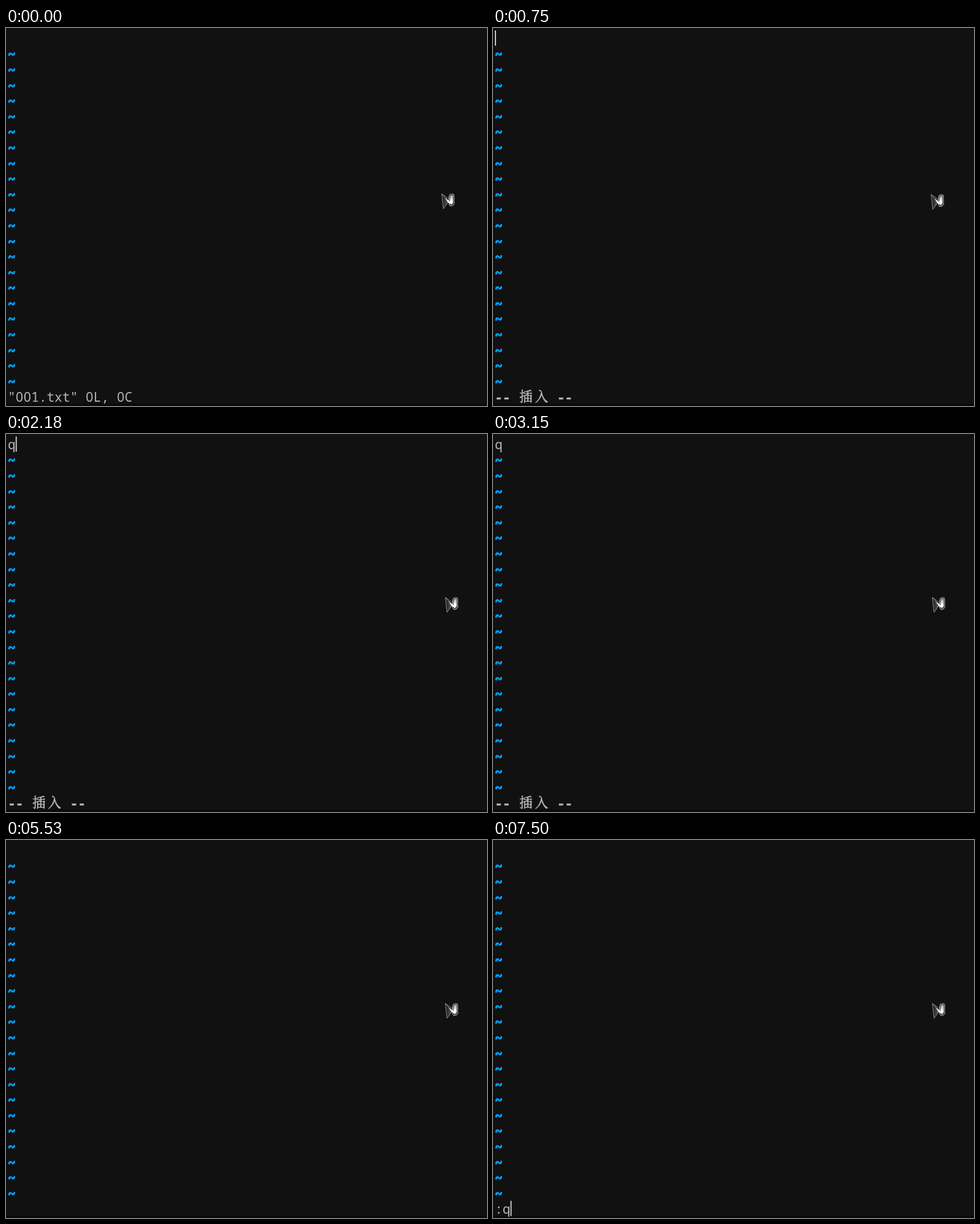
Animation, 791 px wide and 621 px high, one loop 8000 ms. Source, as an HTML page:

```html
<!DOCTYPE html>
<html lang="zh">
<head>
<meta charset="utf-8">
<title>Editor session</title>
<style>
  html, body { margin: 0; width: 100%; height: 100%; overflow: hidden; background: #111; }
  #stage {
    position: relative; width: 791px; height: 621px; overflow: hidden;
    background: linear-gradient(#111 617px, #0e090c 617px);
    color: #b8b8b8;
    font: 21.33px/25.6px "Noto Sans Mono", monospace;
    white-space: pre;
    font-variant-ligatures: none;
  }
  #stage * { animation-duration: 8s; animation-timing-function: step-end; animation-iteration-count: infinite; }
  .row { position: absolute; left: 3px; top: 4px; height: 25.6px; }
  .last { top: 592.8px; }
  #tildes { top: 30.4px; color: #00a2ff; font-weight: 700; -webkit-text-stroke: 1.3px #00a2ff; }
  .zero { display: inline-block; width: .6em; text-align: center; font-family: "Noto Sans", sans-serif; line-height: 1; }
  .wide {
    display: inline-block; width: 1.2em; text-align: center; line-height: 1; font-weight: 400;
    font-family: "Noto Serif CJK SC", "Noto Sans CJK SC", "Noto Sans CJK", serif;
    position: relative; top: -.5px;
  }
  #mode { font-weight: 700; -webkit-text-stroke: .6px #b8b8b8; animation-name: mode; }
  #file { animation-name: file; }
  #typed { animation-name: typed; }
  #colon { animation-name: colon; }
  #quit { animation-name: quit; left: 15.8px; }
  #caret {
    position: absolute; left: 3.2px; top: 4px; width: 2px; height: 24.5px;
    background: #c4c4c4; animation-name: caret;
  }
  #mouse { position: absolute; left: 715px; top: 271px; animation-name: mouse; }

  @keyframes file  { 0% { opacity: 1 } 9.375%, 100% { opacity: 0 } }
  @keyframes mode  { 0% { opacity: 0 } 9.375% { opacity: 1 } 69.125%, 100% { opacity: 0 } }
  @keyframes typed { 0% { opacity: 0 } 27.25% { opacity: 1 } 49.375%, 100% { opacity: 0 } }
  @keyframes colon { 0% { opacity: 0 } 78.875%, 100% { opacity: 1 } }
  @keyframes quit  { 0% { opacity: 0 } 93.75%, 100% { opacity: 1 } }
  @keyframes caret {
    0%      { opacity: 0; transform: none }
    4.5%    { opacity: 1; transform: none }
    14.375% { opacity: 0; transform: none }
    24.5%   { opacity: 1; transform: none }
    27.25%  { opacity: 1; transform: translate(12.8px, 0) }
    39.375% { opacity: 0; transform: none }
    49.375% { opacity: 1; transform: none }
    69.125% { opacity: 0; transform: none }
    78.875% { opacity: 1; transform: translate(12.8px, 588.8px) }
    88.75%  { opacity: 0; transform: none }
    93.75%, 100% { opacity: 1; transform: translate(25.6px, 588.8px) }
  }
  @keyframes mouse {
    0%      { transform: none }
    7%      { transform: translate(4px, 1px) }
    16.875% { transform: translate(5px, -2px) }
    19.625% { transform: translate(5px, -4px) }
    22.125%, 100% { transform: translate(6px, -4px) }
  }
</style>
</head>
<body>
<div id="stage">
  <div class="row" id="tildes"></div>
  <div class="row" id="typed">q</div>
  <div class="row last" id="file">"<span class="zero">0</span><span class="zero">0</span>1.txt" <span class="zero">0</span>L, <span class="zero">0</span>C</div>
  <div class="row last" id="mode">-- <span class="wide">插</span><span class="wide">入</span> --</div>
  <div class="row last" id="colon">:</div>
  <div class="row last" id="quit">q</div>
  <div id="caret"></div>
  <svg id="mouse" width="25" height="29" viewBox="0 0 25 29">
    <defs>
      <linearGradient id="shade"><stop offset="0" stop-color="#151515"/><stop offset="1" stop-color="#666"/></linearGradient>
      <linearGradient id="shine" x2="0" y2="1"><stop offset="0" stop-color="#aaa"/><stop offset=".7" stop-color="#fff"/></linearGradient>
    </defs>
    <path d="M1.5 1.5L4.2 26L13 14Z" fill="url(#shade)" stroke="#aaa" stroke-width=".8" stroke-linejoin="round"/>
    <path d="M1.5 1.5L14 10.5" stroke="#aaa" stroke-width=".8"/>
    <path d="M15 2.5L20.5 1.8L21.8 4V15.5L22.6 16.5L20 20.5L15.5 21.5L13.5 18.5V6Z" fill="#444" stroke="#c8c8c8" stroke-width=".9"/>
    <path d="M7 8L13.5 12.5L17 18.5L12 16Z" fill="#f2f2f2"/>
    <path d="M15.5 6L17 4H20V16L17.5 19L14.5 16.5Z" fill="url(#shine)"/>
  </svg>
</div>
<script>
  document.getElementById("tildes").textContent = "~\n".repeat(22);
</script>
</body>
</html>
```
